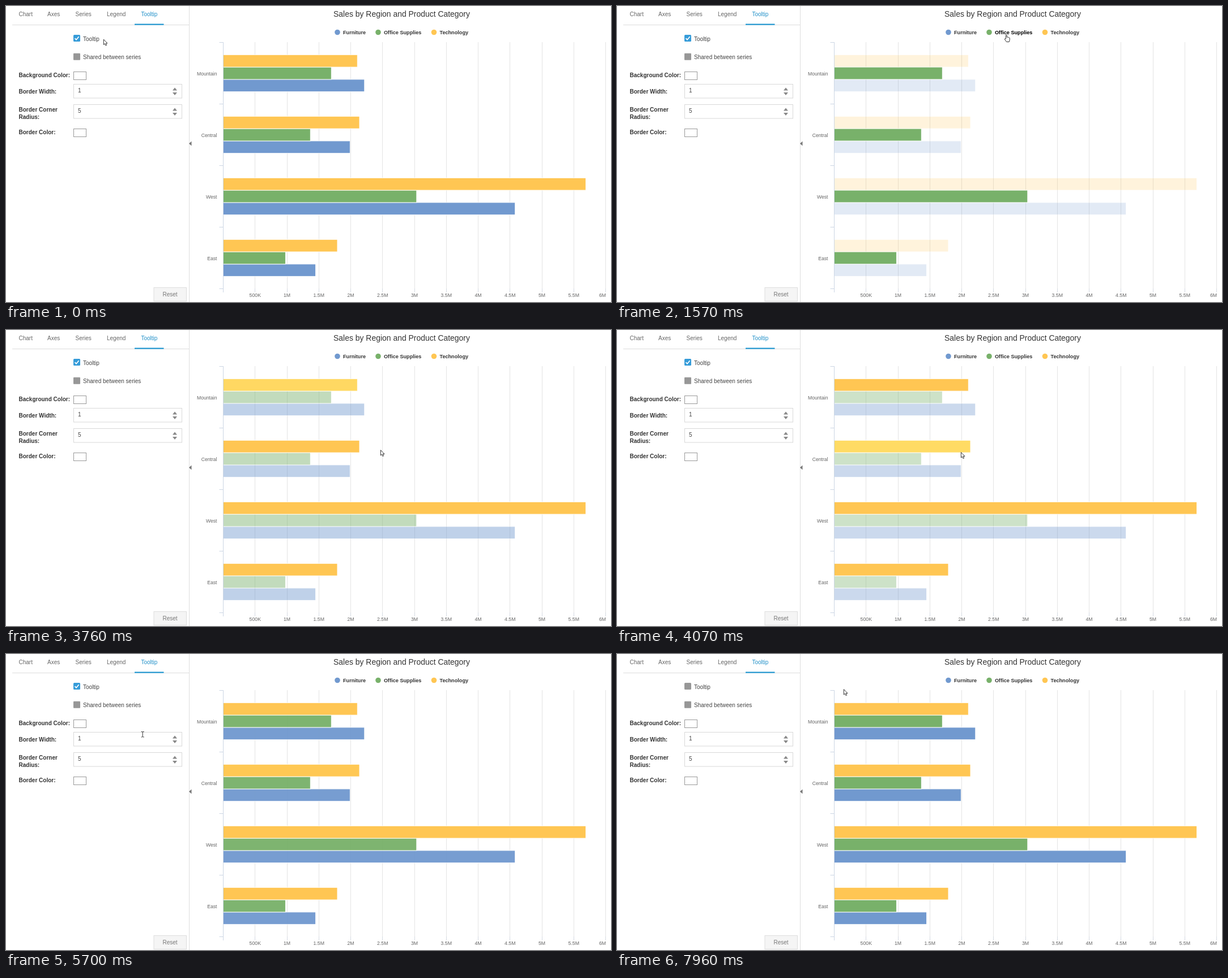
An HTML page for the animation above (8 s loop, 1068 px wide and 524 px high).

```html
<!DOCTYPE html>
<html lang="en">
<head>
<meta charset="utf-8">
<title>Chart tooltip settings</title>
<style>
  html, body { margin: 0; width: 100%; height: 100%; overflow: hidden; background: #fff; }
  svg { display: block; width: 100%; height: 100%; font: 10px "Liberation Sans", Arial, sans-serif; }
  .bold { font-weight: bold; }
</style>
</head>
<body>
<svg id="stage" viewBox="0 0 1068 524"></svg>
<script>
const LOOP = 8000, STEP = 78.1, FIRST = 850, FADE = 6.4;
const stage = document.getElementById('stage');
const AXIS = 383.5, TOP = 64.5, ROW = 109, BAR = 21.8, UNIT = 112.5;

function add(tag, attrs, parent = stage) {
  const el = document.createElementNS('http://www.w3.org/2000/svg', tag);
  for (const name in attrs) el.setAttribute(name, attrs[name]);
  parent.appendChild(el);
  return el;
}
function label(x, y, text, attrs = {}, parent = stage) {
  const el = add('text', { x, y, fill: '#666', ...attrs }, parent);
  el.textContent = text;
  return el;
}
const line = (d, stroke, width = 1) => add('path', { d, stroke, 'stroke-width': width, fill: 'none' });
const box = (x, y, width, height, attrs, parent) => add('rect', { x, y, width, height, ...attrs }, parent);
const bold = { class: 'bold', fill: '#333' };

// Settings panel
line('M11 33.5H323M323.5 0V524', '#ddd');
[[22.5, 'Chart'], [73, 'Axes'], [122.5, 'Series'], [178, 'Legend']].forEach(([x, s]) => label(x, 18, s));
label(238.5, 17.5, 'Tooltip', { fill: '#2391c9' });
box(227, 31.5, 51.5, 2.2, { fill: '#2398d2' });

const check = box(119, 51, 12, 12, { rx: 1.5 });
const tick = line('M121.5 57.2L124 59.8L128.6 54.3', '#fff', 1.7);
box(119, 83.7, 12, 12, { rx: 1, fill: '#979797' });
label(136, 62, 'Tooltip', { fill: '#444' });
label(136, 94, 'Shared between series', { fill: '#444' });

[[126, 'Background Color:'], [154.5, 'Border Width:'], [187, 'Border Corner'],
 [200, 'Radius:'], [227, 'Border Color:']].forEach(([y, s]) => label(22.5, y, s, bold));
[116.5, 217.5].forEach(y => box(119.5, y, 22, 14, { fill: '#fff', stroke: '#999' }));
[[139, '1'], [175, '5']].forEach(([y, s]) => {
  box(119.5, y - .5, 191, 24.5, { fill: '#fff', stroke: '#d8d8d8' });
  label(127, y + 14, s, { fill: '#444' });
  add('path', { d: `M294 ${y + 10.5}l4-5l4 5zM294 ${y + 14}h8l-4 5z`, fill: '#888' });
});
box(261, 498.5, 57.5, 24, { fill: '#f5f5f5', stroke: '#ddd' });
label(289.5, 514, 'Reset', { fill: '#777', 'text-anchor': 'middle' });
add('path', { d: 'M327.5 239.5V247.5L323 243.5z', fill: '#777' });

// Chart
label(698.5, 19, 'Sales by Region and Product Category',
  { fill: '#333', 'font-size': 13.95, 'text-anchor': 'middle' });

const series = [
  { name: 'Furniture', x: 585, color: [113, 153, 207], data: [2.216, 1.99, 4.58, 1.45] },
  { name: 'Office Supplies', x: 657, color: [120, 177, 106], data: [1.696, 1.367, 3.034, .977] },
  { name: 'Technology', x: 755.5, color: [255, 198, 83], data: [2.10471, 2.137764, 5.69, 1.791] }
];
const regions = ['Mountain', 'Central', 'West', 'East'];
const glow = [255, 224, 104];
const rgb = c => `rgb(${c.map(Math.round)})`;

for (let i = 1; i <= 12; i++) {
  const x = AXIS + i * UNIT / 2;
  line(`M${Math.floor(x) + .5} 64V500`, '#e4e4e4');
  line(`M${Math.floor(x) + .5} 500V507`, '#d5dae3');
  label(i === 12 ? 1053 : x, 515, i === 1 ? '500K' : i / 2 + 'M',
    { 'font-size': 8.75, 'text-anchor': 'middle' });
}
series.forEach((s, j) => {
  add('circle', { cx: s.x, cy: 46.5, r: 4.8, fill: rgb(s.color) });
  s.text = label(s.x + 10, 50, s.name, { ...bold, 'font-size': 9.15 });
  s.group = add('g', {});
  s.bars = s.data.map((v, i) => box(AXIS, TOP + i * ROW + (3 - j) * BAR, v * UNIT, BAR,
    { fill: rgb(s.color), stroke: '#fff', 'stroke-width': .9 }, s.group));
});
line(`M${AXIS} 64V507`, '#ccd6e4');
for (let i = 0; i < 5; i++) line(`M376.5 ${Math.round(TOP + i * ROW - .5) + .5}H384`, '#ccd6e4');
regions.forEach((s, i) => label(372.5, 122.5 + i * ROW, s, { 'font-size': 8.65, 'text-anchor': 'end' }));

// Tooltip, drawn relative to the end of its bar
const tip = add('g', { 'font-size': 9.3 });
const outline = 'M8 -29H152Q155 -29 155 -26V28Q155 31 152 31H8Q5 31 5 28V5L0 0L5 -5V-26Q5 -29 8 -29z';
add('path', { d: outline, fill: 'none', stroke: '#000', 'stroke-opacity': .18, 'stroke-width': 2.5,
  transform: 'translate(.8 .8)' }, tip);
add('path', { d: outline, fill: '#fff', stroke: '#f6bf55', 'stroke-width': 1.1 }, tip);
box(5, -29.5, 150, 4, { rx: 1.5, fill: '#ffc653' }, tip);
const values = ['Region:', 'Product Category:', 'Sales:'].map((s, i) => {
  label(14.3, -7 + i * 13.5, s, { fill: '#333' }, tip);
  return label(93.2, -7 + i * 13.5, '', bold, tip);
});

// Pointers, each with its tip at the origin
const ink = { fill: '#fff', stroke: '#222', 'stroke-width': .9, 'stroke-linejoin': 'round' };
const pointers = {
  arrow: add('path', { d: 'M.4 .6V10L2.5 8.1L4 11.5L5.7 10.7L4.2 7.5H7z', ...ink }),
  hand: add('path', { d: 'M2.5 8V1.4Q3.4 0 4.3 1.4V5.2Q5.5 4.4 6 5.4Q7.2 4.9 7.7 6Q9 5.6 9.2 6.8V10' +
    'L8.2 13.5H3.6L.3 8.9Q.4 7 2.5 8z', ...ink }),
  beam: add('path', { d: 'M1.7 0.5H3.5L4.2 1.2L4.9 .5H6.7M4.2 1V9.5M1.7 10H3.5L4.2 9.3L4.9 10H6.7',
    fill: 'none', stroke: '#333' })
};

// Pointer track: step, x, y, shape from here on
const track = [
  [-11, 172, 58.5, 'arrow'], [-1, 172, 58.5, 'arrow'], [1, 170, 58, 'arrow'], [2, 170, 58, 'arrow'],
  [5, 330, 49, 'arrow'], [8, 655, 46, 'hand'], [9, 684, 50, 'hand'], [10, 680, 56, 'arrow'],
  [13, 602, 88, 'arrow'], [31, 602, 88, 'arrow'], [34, 622, 125, 'arrow'], [37, 661, 212, 'arrow'],
  [41, 607, 216, 'arrow'], [42, 604, 217, 'arrow'], [43, 604, 217, 'arrow'], [46, 602, 207, 'arrow'],
  [55, 602, 207, 'arrow'], [56, 600, 192, 'arrow'], [62, 237, 137, 'beam'], [63, 185, 112, 'arrow'],
  [66, 80, 63, 'arrow'], [69, 115, 57, 'arrow'], [70, 115, 57, 'arrow'], [72, 121, 56.5, 'hand'],
  [86, 121, 56.5, 'hand'], [87, 150, 57, 'arrow'], [89, 315, 61, 'arrow'], [91, 400, 62, 'arrow']
];

// Hovers, in steps; each fades back after leaving
const hovers = [
  { from: 8, leave: 9.5, series: 1, legend: true },
  { from: 13, leave: 34.6, series: 2, bar: 0, tip: 19, sales: '2104710.88' },
  { from: 41, leave: 56.6, series: 2, bar: 1, tip: 49, sales: '2137764.34' }
];

const clamp = v => Math.max(0, Math.min(1, v));
const mix = (a, b, p) => a + (b - a) * p;
const sine = p => (1 - Math.cos(Math.PI * p)) / 2;

function movePointer(k) {
  let i = track.length - 1;
  while (i > 0 && track[i][0] > k) i--;
  const a = track[i], b = track[i + 1] || a;
  const p = b === a ? 0 : clamp((k - a[0]) / (b[0] - a[0]));
  for (const name in pointers) pointers[name].setAttribute('visibility', name === a[3] ? 'visible' : 'hidden');
  pointers[a[3]].setAttribute('transform', `translate(${mix(a[1], b[1], p)} ${mix(a[2], b[2], p)})`);
}

function showHover(k) {
  const h = hovers.filter(v => v.from <= k).pop();
  const on = h ? clamp(k - h.from + .8) * (1 - sine(clamp((k - h.leave) / FADE))) : 0;
  series.forEach((s, j) => {
    s.group.setAttribute('opacity', h && h.series !== j ? 1 - .8 * on : 1);
    s.text.setAttribute('fill', h && h.legend && h.series === j && k < h.leave ? '#000' : '#333');
    s.bars.forEach((bar, i) => {
      const lit = h && h.series === j && h.bar === i ? on : 0;
      bar.setAttribute('fill', rgb(s.color.map((c, n) => mix(c, glow[n], lit))));
    });
  });
  const shown = h && k >= h.tip ? 1 - clamp((k - h.leave) / 2) : 0;
  tip.setAttribute('opacity', shown);
  if (!shown) return;
  const s = series[h.series];
  tip.setAttribute('transform',
    `translate(${AXIS + s.data[h.bar] * UNIT} ${TOP + h.bar * ROW + 1.5 * BAR})`);
  [regions[h.bar], s.name, h.sales].forEach((v, i) => { values[i].textContent = v; });
}

function draw(t) {
  const k = Math.floor((t - FIRST) / STEP);
  const checked = k < 75;
  check.setAttribute('fill', checked ? '#369cd9' : '#979797');
  tick.setAttribute('visibility', checked ? 'visible' : 'hidden');
  movePointer(k);
  showHover(k);
}

const start = performance.now();
function frame() {
  draw((performance.now() - start) % LOOP);
  requestAnimationFrame(frame);
}
frame();
</script>
</body>
</html>
```
